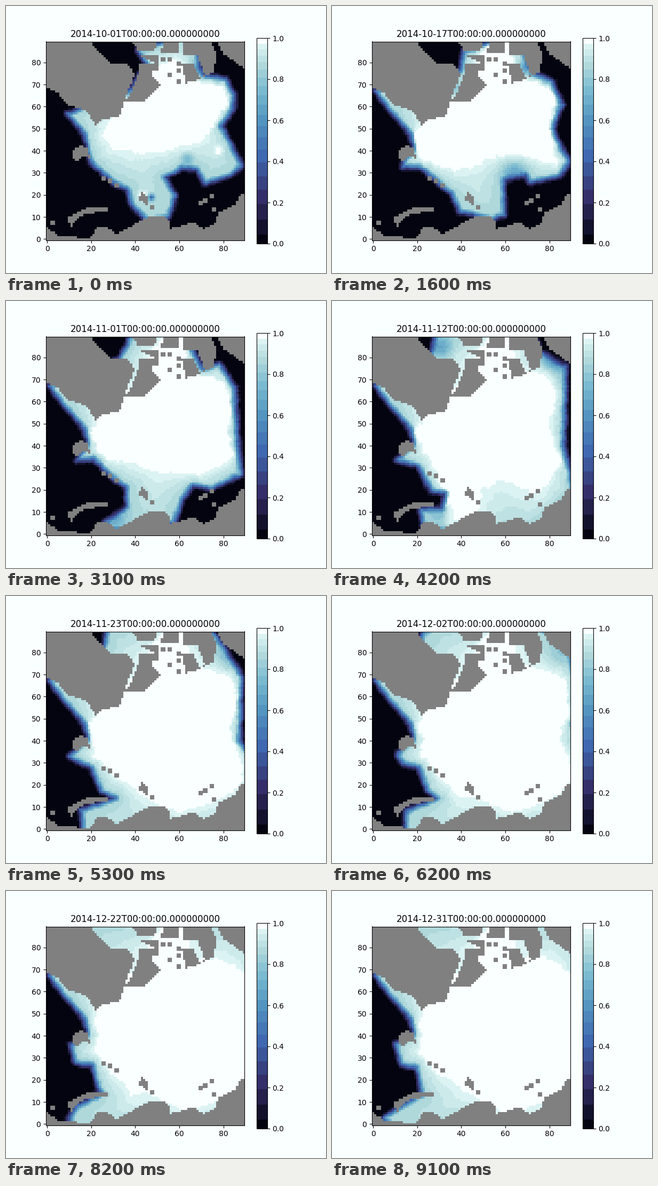
Animation of 600x500 px, one loop 9.2 s. Source, as a matplotlib script:

```python
import numpy as np
import matplotlib.pyplot as plt
from matplotlib.animation import FuncAnimation
from matplotlib.colors import LinearSegmentedColormap, ListedColormap
from matplotlib.path import Path

N, DAYS = 90, 92
PAPER = "#faffff"
CELL = 372 / N
cols, rows = np.meshgrid(np.arange(N), np.arange(N))
# Cell centres in figure pixels, which all outlines below use
X = 75 + (cols + 0.5) * CELL
Y = 438.5 - (rows + 0.5) * CELL
CENTRES = np.column_stack([X.ravel(), Y.ravel()])


def inside(points):
    return Path(points).contains_points(CENTRES).reshape(N, N)


def signed_distance(points):
    """Distance in cells to the outline, positive inside."""
    p = np.array(points, float)
    best = np.full((N, N), np.inf)
    for (ax, ay), (bx, by) in zip(p, np.roll(p, -1, axis=0)):
        dx, dy = bx - ax, by - ay
        t = np.clip(((X - ax) * dx + (Y - ay) * dy) / (dx * dx + dy * dy), 0, 1)
        best = np.minimum(best, np.hypot(X - ax - t * dx, Y - ay - t * dy))
    return np.where(inside(points), best, -best) / CELL


# ---- land -----------------------------------------------------------------
land_mask = np.zeros((N, N), bool)


def land(*points):
    land_mask[inside(points)] = True


def sea(*points):
    land_mask[inside(points)] = False


land((70, 60), (379, 60), (395, 90), (388, 122), (350, 142), (289, 147),
     (258, 178), (222, 178), (212, 206), (180, 212), (168, 222), (150, 196),
     (112, 182), (98, 163), (70, 148))
sea((160, 60), (163, 74), (196, 109), (232, 110), (240, 128), (223, 174),
    (229, 174), (248, 126), (248, 106), (278, 106), (250, 92), (288, 89),
    (298, 60), (284, 60), (278, 83), (247, 83), (232, 60))
sea((322, 60), (322, 88), (285, 88), (285, 118), (270, 124), (287, 147),
    (338, 146), (328, 107), (350, 107), (362, 134), (372, 128), (358, 92),
    (332, 90), (332, 60))
land((393, 60), (405, 88), (455, 123), (455, 60))
land((122, 273), (138, 262), (152, 264), (160, 289), (148, 280), (130, 292))
land((252, 346), (266, 360), (264, 372), (250, 362))
land((117, 395), (120, 417), (130, 400), (150, 388), (191, 385), (191, 376),
     (155, 376))
land((70, 408), (98, 430), (158, 434), (172, 414), (187, 412), (207, 426),
     (272, 392), (304, 396), (306, 417), (350, 405), (372, 417), (392, 405),
     (398, 385), (430, 372), (436, 355), (455, 347), (455, 450), (70, 450))
islets = [(86, 405), (182, 322), (195, 326), (206, 336), (274, 375),
          (366, 369), (373, 363), (387, 354), (389, 380), (293, 99),
          (307, 100), (308, 128), (321, 109), (321, 119), (321, 142)]
for x, y in islets:
    land_mask[(abs(X - x) < CELL) & (abs(Y - y) < CELL)] = True

# ---- ice: outer edge and close pack at a few dates --------------------------
key_days, edges, packs = [], [], []
west = [(80, 158), (114, 202), (147, 240), (152, 268)]
north = [(172, 225), (218, 185), (285, 150), (270, 120), (300, 55), (332, 55),
         (335, 140)]
far_side = [(131, 450), (470, 450), (470, 50), (163, 50)]


def ice(day, edge, pack):
    key_days.append(day)
    edges.append(signed_distance(edge))
    packs.append(signed_distance(pack))


ice(0,
    west[1:] + [
        (158, 292), (200, 330), (226, 342), (234, 370), (263, 402), (305, 394),
        (317, 355), (297, 320), (330, 303), (357, 306), (372, 332), (420, 318),
        (441, 298), (425, 265), (402, 225), (425, 195), (427, 165), (412, 136),
        (370, 128), (358, 88), (330, 55), (246, 82), (262, 108), (235, 150)],
    [(188, 240), (222, 180), (285, 145), (272, 118), (320, 110), (340, 145),
     (405, 152), (412, 185), (370, 240), (295, 264), (200, 256)])
ice(16,
    west + [
        (133, 292), (133, 301), (165, 302), (222, 350), (240, 385), (300, 399),
        (322, 390), (322, 325), (362, 316), (370, 330), (425, 320), (445, 290),
        (430, 265), (413, 230), (431, 185), (412, 140), (375, 124), (358, 86),
        (330, 55), (246, 84), (240, 120)],
    north + [
        (380, 143), (418, 165), (404, 230), (417, 290), (350, 270), (300, 275),
        (230, 300), (168, 288), (152, 240)])
ice(31,
    west + [
        (133, 298), (165, 296), (192, 325), (224, 348), (226, 385), (185, 412),
        (195, 430), (315, 415), (330, 370), (350, 345), (385, 352), (440, 325),
        (433, 250), (428, 160), (400, 117), (368, 125), (330, 55), (240, 55),
        (212, 108)],
    north + [
        (405, 150), (425, 205), (405, 240), (425, 285), (365, 320), (290, 310),
        (235, 295), (185, 295), (162, 250)])
ice(42,
    west + [
        (120, 298), (160, 308), (185, 355), (212, 360), (205, 388), (165, 388),
        (172, 430), (380, 430), (452, 355), (434, 270), (437, 170), (438, 120),
        (390, 95), (375, 55), (195, 55), (185, 95)],
    north + [
        (405, 135), (418, 190), (395, 230), (428, 300), (385, 352), (318, 310),
        (262, 345), (268, 395), (220, 415), (205, 330), (155, 245)])
ice(53,
    west + [
        (118, 300), (160, 322), (178, 365), (205, 378), (140, 400), (145, 450),
        (460, 450), (460, 305), (438, 270), (442, 150), (410, 98), (378, 55),
        (190, 55), (182, 95)],
    north + [
        (420, 150), (430, 205), (412, 250), (430, 285), (440, 350), (325, 395),
        (235, 350), (170, 300), (158, 240)])
ice(72,
    west + [(124, 290), (130, 318), (165, 320), (178, 362), (190, 378),
            (133, 405)] + far_side,
    north + [
        (440, 150), (455, 220), (425, 270), (455, 345), (350, 400), (262, 345),
        (235, 390), (172, 290), (188, 270), (170, 240)])
ice(91,
    west + [(118, 285), (130, 325), (158, 330), (168, 380), (125, 405),
            (95, 425)] + far_side,
    north + [
        (410, 140), (455, 165), (455, 345), (365, 400), (320, 405), (240, 350),
        (190, 330), (170, 305), (168, 245)])

# ---- local thickening and thinning, amounts by day --------------------------
bumps = []


def bump(x, y, radius, **amounts):
    by_day = {int(name[1:]): value for name, value in amounts.items()}
    shape = np.exp(-((X - x) ** 2 + (Y - y) ** 2) / radius ** 2)
    bumps.append((shape, [by_day.get(day, 0) for day in key_days]))


bump(398, 270, 9, d0=.11)
bump(256, 354, 9, d0=.15)
bump(272, 358, 6, d0=-.45)
bump(340, 285, 11, d0=-.17)
bump(340, 312, 22, d16=-.2)
bump(200, 402, 24, d31=-.2, d42=-.12)
bump(425, 105, 28, d42=-.35, d53=-.15)
bump(205, 85, 20, d42=-.2)
bump(230, 155, 14, d0=-.35, d16=-.15)
bump(362, 115, 12, d0=-.35, d16=-.25, d31=-.15)

rng = np.random.default_rng(4)
rough = rng.normal(size=(N, N))
for axis in (0, 1):
    rough = sum(np.roll(rough, k, axis) for k in (-1, 0, 1)) / 3


def concentration(day):
    k = min(np.searchsorted(key_days, day, side="right") - 1, len(key_days) - 2)
    u = (day - key_days[k]) / (key_days[k + 1] - key_days[k])

    def blend(series):
        return series[k] * (1 - u) + series[k + 1] * u

    edge = blend(edges) + 0.5 * rough
    pack = blend(packs) + 1.2 * rough
    rim = np.clip((edge + 2) / 4, 0, 1)
    depth, gap = np.maximum(edge - 1, 0), np.maximum(-pack, 0)
    closing = depth / (depth + gap + 1e-6)
    ice_now = rim * (0.85 + 0.15 * closing)
    ice_now += rim * sum(shape * blend(amount) for shape, amount in bumps)
    return np.ma.array(np.clip(ice_now, 0, 1), mask=land_mask)


# ---- colours in steps that narrow towards full cover ------------------------
i = np.arange(19)
steps = 0.04 + 0.078 * i - 0.00145 * i ** 2
ramp = LinearSegmentedColormap.from_list("ramp", [
    "#03040f", "#35306b", "#3f68b1", "#5395c0", "#7abad0", "#afd8db", "#dcf3f3"])
shades = [ramp(t) for t in np.linspace(0, 1, 19)] + [PAPER]
levels = np.searchsorted(steps, np.linspace(0, 1, 256))
ice_map = ListedColormap([shades[n] for n in levels])
ice_map.set_bad("gray")

fig, ax = plt.subplots(figsize=(6, 5), dpi=100, facecolor=PAPER)
image = ax.imshow(concentration(0), origin="lower", cmap=ice_map, vmin=0, vmax=1)
fig.colorbar(image)
title = ax.set_title("")
START = np.datetime64("2014-10-01")


def update(day):
    image.set_data(concentration(day))
    title.set_text(f"{START + np.timedelta64(day, 'D')}T00:00:00.000000000")
    return image, title


anim = FuncAnimation(fig, update, frames=DAYS, interval=100, repeat=True,
                     repeat_delay=0)
plt.show()
```
